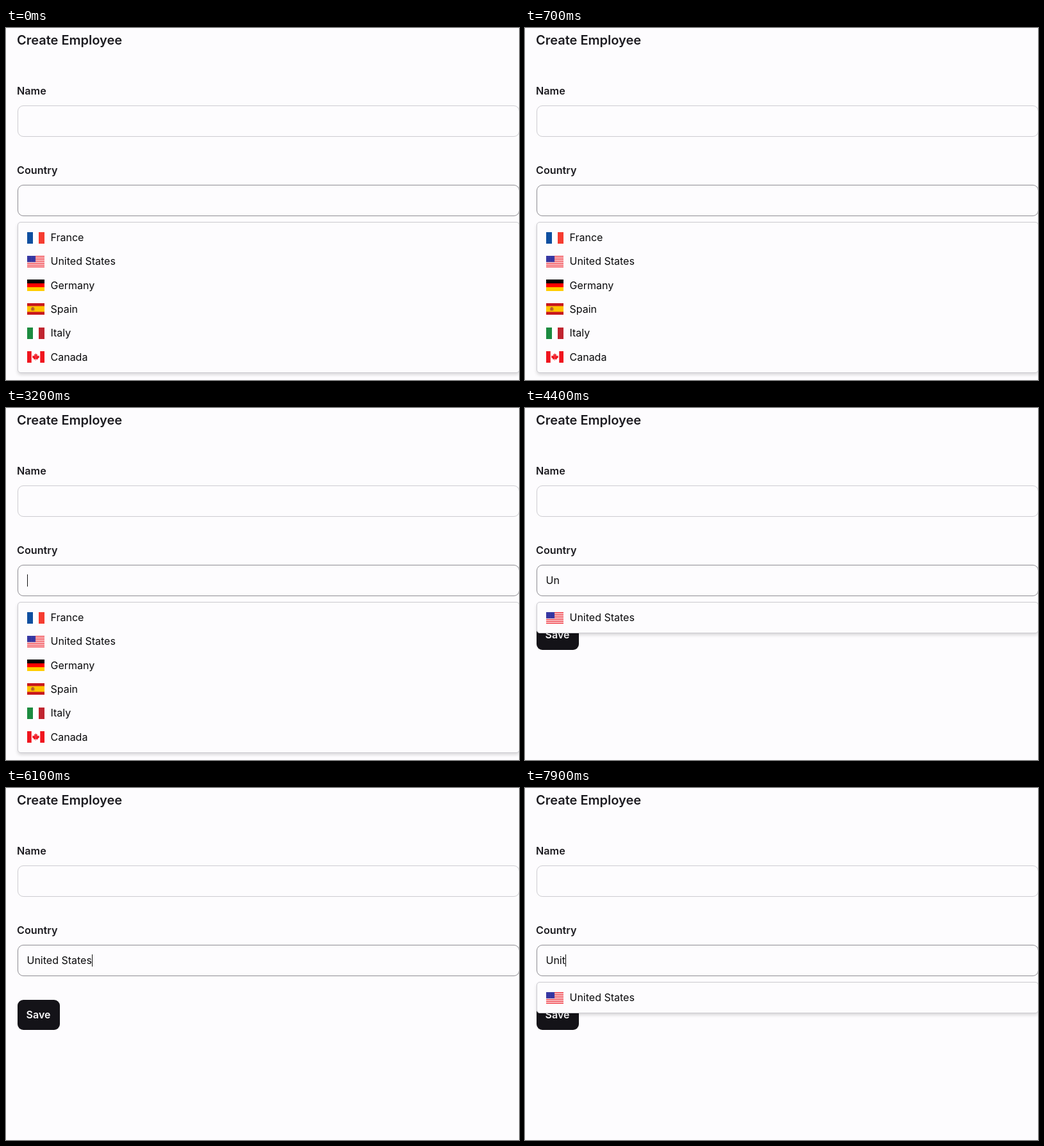
Recreate the animation shown at these times as an HTML page. Size 800 px wide and 550 px high, loop 8000 ms.

```html
<!DOCTYPE html>
<html lang="en">
<head>
<meta charset="utf-8">
<title>Create Employee</title>
<style>
  html, body { margin: 0; width: 100%; height: 100%; overflow: hidden; background: #fdfcfe; }
  #stage {
    position: relative; width: 800px; height: 550px; overflow: hidden;
    font: 400 16px Inter, sans-serif; font-optical-sizing: none; color: #09090b;
    -webkit-font-smoothing: antialiased;
  }
  #stage > * { position: absolute; box-sizing: border-box; white-space: pre; }
  h1, label { left: 17px; margin: 0; color: #1c1b20; font-weight: 600; }
  h1 { top: 4px; font-size: 20px; line-height: 30px; }
  label { font-size: 16.2px; line-height: 24px; }
  .field {
    left: 17.5px; width: 783px; height: 49px; border: 1px solid #cdccd1;
    border-radius: 9px; padding-left: 14px; line-height: 47px;
  }
  #country { border-color: #8e8d93; }
  #caret {
    display: inline-block; width: 1.4px; height: 19px; background: #111;
    vertical-align: middle; margin: -2px 0 0;
  }
  #save {
    left: 17.5px; top: 331px; width: 66px; height: 46.5px; border-radius: 9px;
    background: #141318; color: #fbfafc; font-weight: 600; line-height: 47px; text-align: center;
  }
  #list {
    left: 17.5px; top: 303px; width: 783px; padding: 5px 0 4.7px;
    border: 1px solid #cbcacf; border-radius: 5px; background: #fdfcfe;
    box-shadow: 0 3px 5px rgba(0, 0, 0, .14);
  }
  .row { position: relative; height: 37.33px; line-height: 37.33px; padding-left: 51px; }
  .row.on { background: #e1e1e4; }
  .row svg { position: absolute; left: 14.5px; top: 9.5px; width: 27px; height: 18px; }
  #cursor { left: 0; top: 0; filter: drop-shadow(0 1px 1px rgba(0, 0, 0, .35)); }
</style>
</head>
<body>
<div id="stage">
  <h1>Create Employee</h1>
  <label style="top:86px">Name</label>
  <div class="field" style="top:121px"></div>
  <label style="top:209.5px">Country</label>
  <div class="field" id="country" style="top:245px"><span id="typed"></span><span id="caret"></span></div>
  <div id="save">Save</div>
  <div id="list"></div>
  <svg id="cursor" width="16" height="24" viewBox="-1 -1 16 24">
    <path d="M0 0V16.2L3.8 12.7L6.4 18.8L9 17.7L6.4 11.7H11.4Z" fill="#000" stroke="#fff" stroke-width="1.2"/>
  </svg>
</div>
<script>
const $ = id => document.getElementById(id);
const LOOP = 8000, TICK = 100;

const rect = (x, y, w, h, fill) =>
  `<rect x="${x}" y="${y}" width="${w}" height="${h}" fill="${fill}"/>`;
const path = (d, attrs) => `<path d="${d}" ${attrs}/>`;
const columns = colors => colors.map((c, i) => rect(i * 9, 0, 9, 18, c)).join('');
const bands = colors => colors.map((c, i) => rect(0, i * 6, 27, 6, c)).join('');

function usFlag() {
  const h = 18 / 13;
  let s = rect(0, 0, 27, 18, '#fff');
  for (let i = 0; i < 13; i += 2) s += rect(0, i * h, 27, h, '#ee2b35');
  s += rect(0, 0, 13, 7 * h, '#2a2b9c');
  for (let r = 0; r < 4; r++)
    for (let c = 0; c < 5; c++)
      s += `<circle cx="${1.5 + c * 2.5}" cy="${1.4 + r * 2.3}" r=".4" fill="#d5d5f2"/>`;
  return s;
}

function canadaFlag() {
  const half = path('M13.5 3L14.7 5.2L16 4.6L15.4 8L17 6.5L17.4 7.4L19 7.1L18.5 8.8L19.2 9.4' +
    'L16.4 11.8L16.7 12.9L13.8 12.5V15H13.5Z', 'fill="#f0141e"');
  return rect(0, 0, 27, 18, '#fff') + rect(0, 0, 6.75, 18, '#f0141e') +
    rect(20.25, 0, 6.75, 18, '#f0141e') + half +
    `<g transform="matrix(-1 0 0 1 27 0)">${half}</g>`;
}

function southAfricaFlag() {
  const y = 'M0 0L13.5 9L0 18M13.5 9H27';
  return rect(0, 0, 27, 9, '#e03c31') + rect(0, 9, 27, 9, '#10169a') +
    path(y, 'fill="none" stroke="#fff" stroke-width="6"') +
    path('M0 0L13.5 9L0 18Z', 'fill="#ffb81c"') +
    path('M0 3.6L8.1 9L0 14.4Z', 'fill="#000"') +
    path(y, 'fill="none" stroke="#0b7a4b" stroke-width="3.6"');
}

const flags = {
  'France': columns(['#0f4fa0', '#fff', '#f63c30']),
  'United States': usFlag(),
  'Germany': bands(['#000', '#f00', '#fc0']),
  'Spain': rect(0, 0, 27, 18, '#c8171e') + rect(0, 4.5, 27, 9, '#ffc400') +
    rect(6, 7.2, 1, 4.2, '#a8703a') + rect(10.6, 7.2, 1, 4.2, '#a8703a') +
    rect(7.3, 6.2, 3, 5.4, '#b0522c'),
  'Italy': columns(['#1c8b40', '#fff', '#c0242f']),
  'Canada': canadaFlag(),
  'South Africa': southAfricaFlag()
};
const all = Object.keys(flags).slice(0, 6);
const usa = ['United States'];

// Each key press: time, field text, listed countries
const keys = [
  [-1000, '', all],
  [1000, 'F', ['France', 'South Africa']],
  [2000, '', all],
  [3500, 'U', ['United States', 'South Africa']],
  [3600, 'Un', usa],
  [4900, 'United States', []]
];
for (let n = 12; n >= 4; n--)
  keys.push([6500 + (12 - n) * 165, 'United States'.slice(0, n), usa]);

// Caret blinks: start of fade out, start of fade in
const blinks = [[-500, 50], [500, 1000], [1500, 2000], [2500, 3000], [4000, 4500], [5400, 5900]];
const clamp = v => Math.max(0, Math.min(1, v));

function caretAlpha(t, lastKey) {
  if (t - lastKey < 300) return 1;
  const b = blinks.find(([out, back]) => t >= out && t < back + 200);
  if (!b) return 1;
  const lead = b[1] === 50 ? -50 : 50;
  return b[1] === 50 ? clamp(t / 200)
    : t < b[1] ? clamp(1 - (t - b[0] + lead) / 200) : clamp((t - b[1] + lead) / 200);
}

let shown = '';
function drawList(rows, active) {
  const key = rows.join() + active;
  if (key === shown) return;
  shown = key;
  $('list').style.display = rows.length ? 'block' : 'none';
  $('list').innerHTML = rows.map(name =>
    `<div class="row${name === active ? ' on' : ''}"><svg viewBox="0 0 27 18">${flags[name]}</svg>${name}</div>`
  ).join('');
}

function draw(now) {
  const t = Math.floor(now % LOOP / TICK) * TICK;
  const [at, text, rows] = keys.filter(k => k[0] <= t).pop();
  const pointing = t >= 100 && t < 300;
  $('typed').textContent = text;
  $('caret').style.opacity = caretAlpha(t, at);
  drawList(rows, pointing ? 'France' : '');
  const k = (200 - t) / 100;
  $('cursor').style.display = pointing ? 'block' : 'none';
  $('cursor').style.transform = `translate(${376 + 2 * k}px, ${302 + 16 * k}px)`;
}

const start = performance.now();
function frame() {
  draw(performance.now() - start);
  requestAnimationFrame(frame);
}
frame();
</script>
</body>
</html>
```
